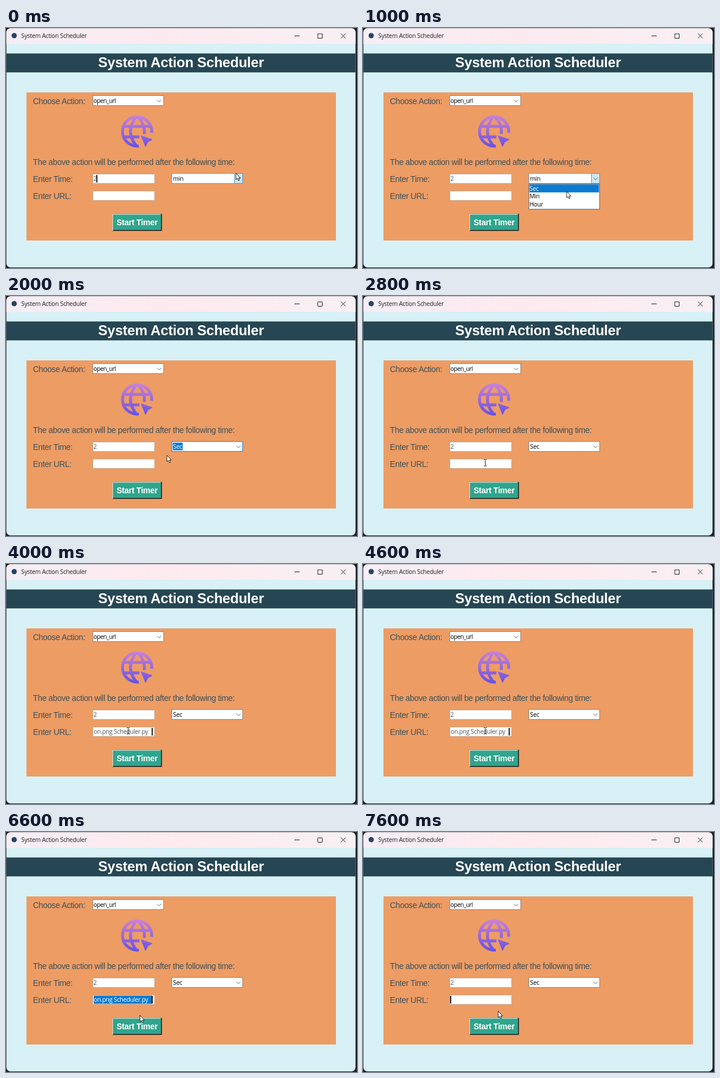
Animation of 600x410 px, one loop 8000 ms. Source, as an HTML page:

```html
<!DOCTYPE html>
<html lang="en">
<head>
<meta charset="utf-8">
<title>System Action Scheduler</title>
<style>
html, body { margin: 0; width: 100%; height: 100%; overflow: hidden; background: #1f2022; }
svg { display: block; width: 600px; height: 410px; }
text { font: 500 10.3px "Open Sans", "Noto Sans", sans-serif; letter-spacing: -.27px; white-space: pre; }
.label { font: 14px "Liberation Sans", Arial, sans-serif; letter-spacing: -.35px; fill: #3c525a; }
.bold { font: bold 14px "Liberation Sans", Arial, sans-serif; letter-spacing: -.33px; fill: #fff; }
.heading { font-size: 24px; letter-spacing: -.23px; }
.line { fill: none; stroke: #222; }
.entry { fill: #fff; stroke: #c9aa94; }
.combo { fill: #fff; stroke: #94877d; }
.typed { fill: #4c5357; }
.chosen { fill: #0a7ad3; }
</style>
</head>
<body>
<svg viewBox="0 0 600 410">
  <defs>
    <linearGradient id="bar">
      <stop offset="0" stop-color="#f6eef6"/>
      <stop offset=".45" stop-color="#fdeaee"/>
      <stop offset="1" stop-color="#f9f0f4"/>
    </linearGradient>
    <linearGradient id="violet" gradientUnits="userSpaceOnUse" x1="0" y1="149" x2="0" y2="205">
      <stop offset="0" stop-color="#cb82d6"/>
      <stop offset="1" stop-color="#6450e8"/>
    </linearGradient>
    <clipPath id="window"><rect x=".7" y=".5" width="596.8" height="408.5" rx="7"/></clipPath>
    <path id="chevron" class="line" d="M-3.5-1.7 0 1.8 3.5-1.7" style="stroke:#666"/>
  </defs>

  <g clip-path="url(#window)">
    <rect width="600" height="410" fill="#d8f1f6"/>
    <rect width="600" height="27" fill="url(#bar)"/>
    <rect y="43.5" width="600" height="32.3" fill="#264653"/>
  </g>
  <circle cx="14" cy="13" r="4.5" fill="#254468"/>
  <text x="26" y="17" fill="#222">System Action Scheduler</text>
  <path class="line" d="M493 13.5h9M533 10h7.5v7.5h-7.5zM572.5 9.5l8 8m0-8l-8 8"/>
  <text class="bold heading" x="157.5" y="67.3">System Action Scheduler</text>

  <rect x="35" y="110" width="529" height="253" fill="#ed9c64"/>
  <text class="label" x="46" y="129.5">Choose Action:</text>
  <text class="label" x="46" y="233.5">The above action will be performed after the following time:</text>
  <text class="label" x="46" y="262.5">Enter Time:</text>
  <text class="label" x="46" y="291.5">Enter URL:</text>

  <rect class="combo" x="148.5" y="115.5" width="121" height="17"/>
  <text x="149.5" y="127.8" style="letter-spacing:-.55px">open_url</text>
  <use href="#chevron" x="262" y="124.5"/>

  <g fill="none" stroke="url(#violet)" stroke-width="5">
    <path d="M249 179A25 25 0 1 0 227 201.500"/>
    <path d="M222.500 152Q203 177 222.500 201M225.500 152Q238 164 236.500 181M200 168H248M200 186H228"/>
  </g>
  <path d="M231 184 250 190.500 242.500 194.500 238.500 202.500Z" fill="url(#violet)" stroke="url(#violet)" stroke-linejoin="round"/>

  <rect class="entry" x="148.5" y="249.5" width="105.5" height="16"/>
  <text class="typed" x="149.5" y="261">2</text>
  <rect class="entry" x="148.5" y="278.5" width="105.5" height="16"/>
  <rect id="urlMark" class="chosen" x="150" y="279.5" width="100" height="14"/>
  <text id="url" x="150" y="290">on.png Scheduler.py</text>
  <rect id="caret" width="1.7" height="13"/>

  <rect id="unitBox" class="combo" x="283.5" y="248.5" width="121" height="17"/>
  <rect id="unitButton" x="390.5" y="248.5" width="14" height="17" fill="#cfe5f3" stroke="#5b97bd"/>
  <rect id="unitMark" class="chosen" x="285" y="250.5" width="17" height="13"/>
  <text id="unit" x="285.5" y="261"></text>
  <use href="#chevron" x="397.5" y="257.5"/>

  <path d="M182 317.5h84.5v29h-84.5z" fill="#10201e"/>
  <path d="M182 317.5h83.500l-1.500 1.500h-80.500v26l-1.500 1.500z" fill="#c9e2d6"/>
  <path d="M183.5 319h81.500v26h-81.500z" fill="#2fa58d"/>
  <text class="bold" x="189" y="337">Start Timer</text>

  <g id="list">
    <rect x="283.5" y="266.5" width="121" height="43" fill="#fff" stroke="#6e6a67"/>
    <rect id="rowMark" class="chosen" x="284.5" width="119" height="13.5"/>
  </g>

  <path id="arrow" d="M0 0V11L2.5 8.900 4.200 12.700 6 12 4.400 8.200H7.600Z" fill="#fff" stroke="#111" stroke-width=".9"/>
  <path id="beam" class="line" d="M-2.500-5.500H-.8L0-4.700.8-5.500H2.500M0-4.700V4.700M-2.500 5.500H-.8L0 4.700.8 5.500H2.500"/>
</svg>
<script>
const LOOP = 8000, STEP = 200;
const $ = id => document.getElementById(id);
const show = (id, on) => { $(id).style.display = on ? "" : "none"; };
const set = (id, attrs) => {
  for (const name in attrs) $(id).setAttribute(name, attrs[name]);
};

// time, x, y of the pointer
const path = [
  [0, 393, 248], [200, 395, 254], [600, 395, 257], [1000, 348, 279],
  [1200, 381, 283], [1400, 326, 283], [1600, 326, 283], [1800, 300, 275],
  [2000, 275, 272], [2400, 232, 284], [2600, 209, 285], [5000, 209, 285],
  [5600, 258, 330], [6000, 250, 326], [6600, 229, 313], [6800, 227, 320],
  [7000, 231, 306], [LOOP, 231, 306]
];
const caretTimes = [[0, 200], [4000, 4200], [4600, 5200], [5600, 6000], [6400, 7000], [7600, LOOP]];

const rows = ["Sec", "Min", "Hour"].map((name, i) => {
  const row = document.createElementNS("http://www.w3.org/2000/svg", "text");
  row.textContent = name;
  row.setAttribute("x", 284.5);
  row.setAttribute("y", 277.5 + 13.8 * i);
  return $("list").appendChild(row);
});

function pointerAt(t) {
  const i = path.findIndex(key => key[0] > t);
  const [t0, x0, y0] = path[i - 1], [t1, x1, y1] = path[i];
  const k = (t - t0) / (t1 - t0);
  return [x0 + (x1 - x0) * k, y0 + (y1 - y0) * k];
}

function draw(t) {
  const within = (from, to) => t >= from && t < to;

  const unitSelected = within(1800, 2600);
  $("unit").textContent = t < 1800 ? "min" : "Sec";
  set("unit", { fill: unitSelected ? "#fff" : "#000" });
  show("unitMark", unitSelected);
  show("unitButton", t < 1800);
  $("unitBox").style.stroke = t < 1800 ? "#7f9fb2" : unitSelected ? "#2387cf" : "";

  const active = within(1200, 1800) ? 1 : 0;
  show("list", within(400, 1800));
  set("rowMark", { y: 267.3 + 13.8 * active });
  rows.forEach((row, i) => row.setAttribute("fill", i === active ? "#fff" : "#000"));

  const urlSelected = within(5000, 7400);
  show("url", within(4000, 7400));
  show("urlMark", urlSelected);
  set("url", { fill: urlSelected ? "#fff" : "#4c5357" });

  show("caret", caretTimes.some(([from, to]) => within(from, to)));
  set("caret", t < 200 ? { x: 154.5, y: 251 } : { x: t < 7400 ? 249 : 149, y: 280 });

  const [x, y] = pointerAt(t);
  const overEntry = x > 148 && x < 254 && y > 278 && y < 295;
  const place = { transform: `translate(${x} ${y})` };
  show("arrow", !overEntry);
  show("beam", overEntry);
  set("arrow", place);
  set("beam", place);
}

const start = performance.now();
function tick() {
  const t = (performance.now() - start) % LOOP;
  draw(Math.floor(t / STEP) * STEP);
  requestAnimationFrame(tick);
}
tick();
</script>
</body>
</html>
```
